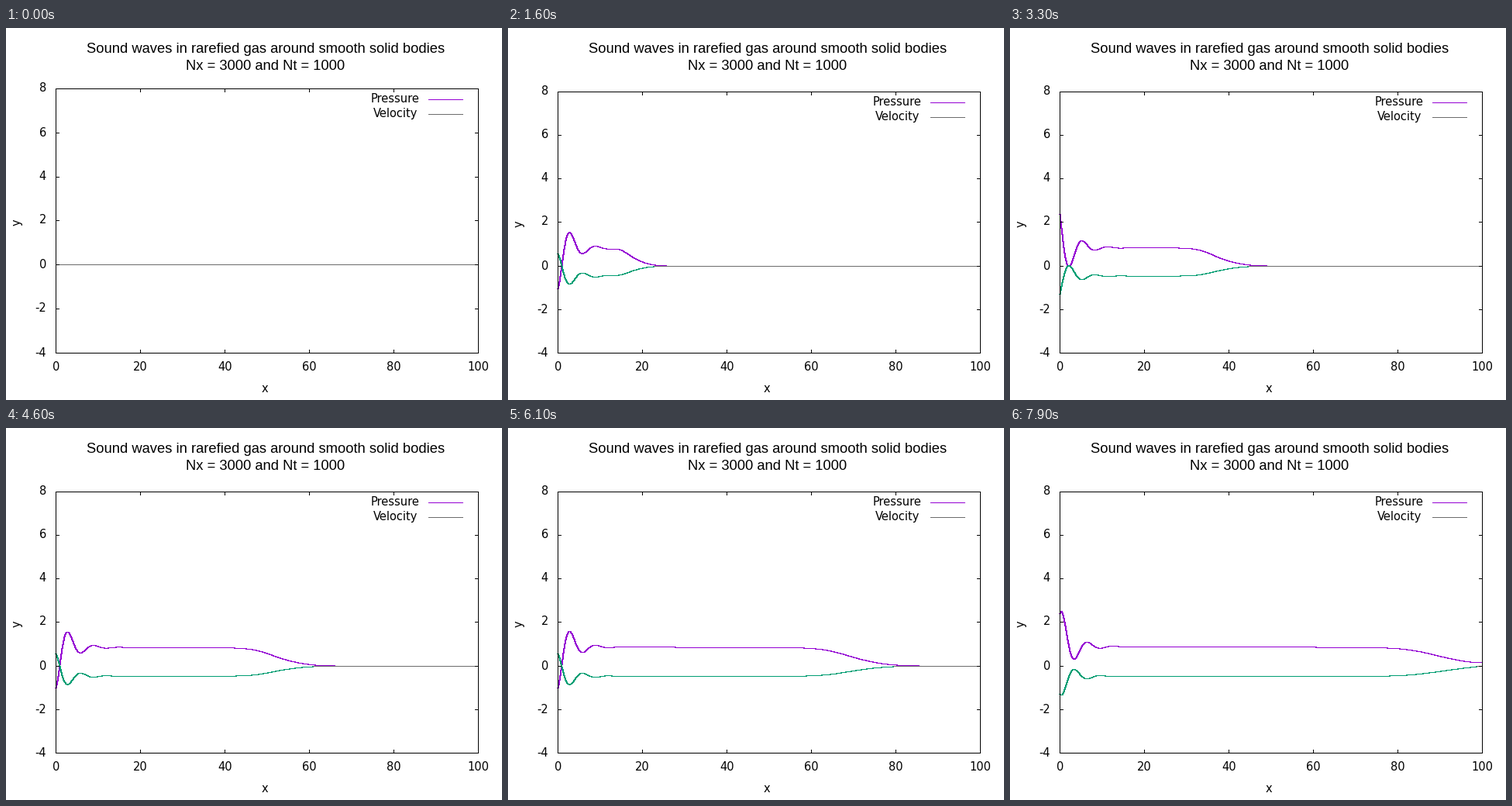
Recreate the animation shown at these times as a matplotlib script. Size 640x480 px, loop 8000 ms.

```python
import math

import matplotlib.pyplot as plt
import numpy as np
from matplotlib.animation import FuncAnimation

W, H, DPI = 640, 480, 100
FRAMES, INTERVAL = 80, 100
LEFT, RIGHT, BOTTOM = 64, 609, 419
PURPLE, GREEN, GREY = "#9400d3", "#009e73", "#6c6c6c"
PERIOD, WAVELENGTH, DECAY, AMP = 5, 6.1, 0.335, 1.88
SPEED = 1.155

erfc = np.vectorize(math.erfc)
cols = np.arange(LEFT, RIGHT + 1)
xs = (cols - LEFT) * 100 / (RIGHT - LEFT)

fig = plt.figure(figsize=(W / DPI, H / DPI), dpi=DPI, facecolor="white")
ax = fig.add_axes([0, 0, 1, 1])


def front(x, n, lag):
    """Smooth step travelling right, steeper behind than ahead."""
    d = x - (SPEED * n - lag)
    ahead = 1.16 * math.sqrt(n)
    behind = ahead * (0.62 + 0.004 * n)
    width = behind + (ahead - behind) * (0.5 + 0.5 * np.tanh(d / 3))
    return 0.5 * erfc(d / width)


def ripple(x, n):
    """Damped wave driven by the oscillating wall at x = 0."""
    phase = 2 * math.pi * ((n - 1) / PERIOD - x / WAVELENGTH)
    return -AMP * np.exp(-DECAY * x) * np.cos(phase) * front(x, n, 0)


def fields(n):
    if n == 0:
        return np.zeros_like(xs), np.zeros_like(xs)
    step, osc = front(xs, n, 0.8), ripple(xs, n)
    echo = front(200 - xs, n, 0.8)
    p = (0.81 + 0.0011 * n - 0.0006 * xs) * step + osc + 0.8 * echo
    v = -(0.45 + 0.0003 * n) * (step - echo) - 0.54 * osc
    return p, v


def line(x, y, color, z=2):
    ax.plot(np.asarray(x) + 0.5, np.asarray(y) + 0.5, color=color, lw=72 / DPI,
            antialiased=False, snap=False, zorder=z,
            solid_capstyle="projecting", solid_joinstyle="miter")


def text(x, y, s, px=14.67, font="DejaVu Sans", ha="center", **kw):
    kw.setdefault("va", "baseline")
    ax.text(x, y, s, fontsize=px * 72 / DPI, family=font, ha=ha,
            color="black", **kw)


def draw_frame(top):
    line([LEFT, RIGHT, RIGHT, LEFT, LEFT], [top, top, BOTTOM, BOTTOM, top],
         "black", 5)
    for val in range(0, 101, 20):
        x = round(LEFT + val * (RIGHT - LEFT) / 100)
        line([x, x], [BOTTOM, BOTTOM - 4], "black", 5)
        line([x, x], [top, top + 4], "black", 5)
        text(x + 0.5, 442, str(val))
    for val in range(-4, 9, 2):
        y = round(BOTTOM - (val + 4) * (BOTTOM - top) / 12)
        line([LEFT, LEFT + 4], [y, y], "black", 5)
        line([RIGHT, RIGHT - 4], [y, y], "black", 5)
        text(52, y + 4.5, str(val), ha="right")
    text(334, 470, "x")
    text(14, (top + BOTTOM) / 2 + 2.5, "y", rotation=90, va="center")
    text(335.5, 32, "Sound waves in rarefied gas around smooth solid bodies",
         18.4, "Liberation Sans")
    text(334.5, 54, "Nx = 3000 and Nt = 1000", 18.4, "Liberation Sans")


def draw_key(top):
    keys = (("Pressure", PURPLE, 14, 533), ("Velocity", GREY, 33, 531))
    for name, color, dy, right in keys:
        line([545, 589], [top + dy] * 2, color)
        text(right, top + dy + 4, name, ha="right")


def update(n):
    ax.cla()
    ax.set(xlim=(0, W), ylim=(H, 0))
    ax.axis("off")
    top = 78 if n == 0 else 82
    scale = (BOTTOM - top) / 12
    zero = BOTTOM - 4 * scale
    p, v = (np.rint(zero - f * scale) for f in fields(n))
    line(cols, p, PURPLE, 2)
    line(cols, v, GREEN, 3)
    # The undisturbed gas ahead of the wave is grey.
    moved = np.flatnonzero((p != round(zero)) | (v != round(zero)))
    still = moved[-1] + 1 if moved.size else 0
    calm = np.flatnonzero(v != round(zero))
    start = min(still, calm[-1] + 1) if calm.size else still
    if start < len(cols):
        line(cols[start:], np.full(len(cols) - start, round(zero)), GREY, 4)
    draw_frame(top)
    draw_key(top)
    return []


anim = FuncAnimation(fig, update, frames=FRAMES, interval=INTERVAL,
                     init_func=lambda: [], repeat=True, repeat_delay=0)
plt.show()
```
